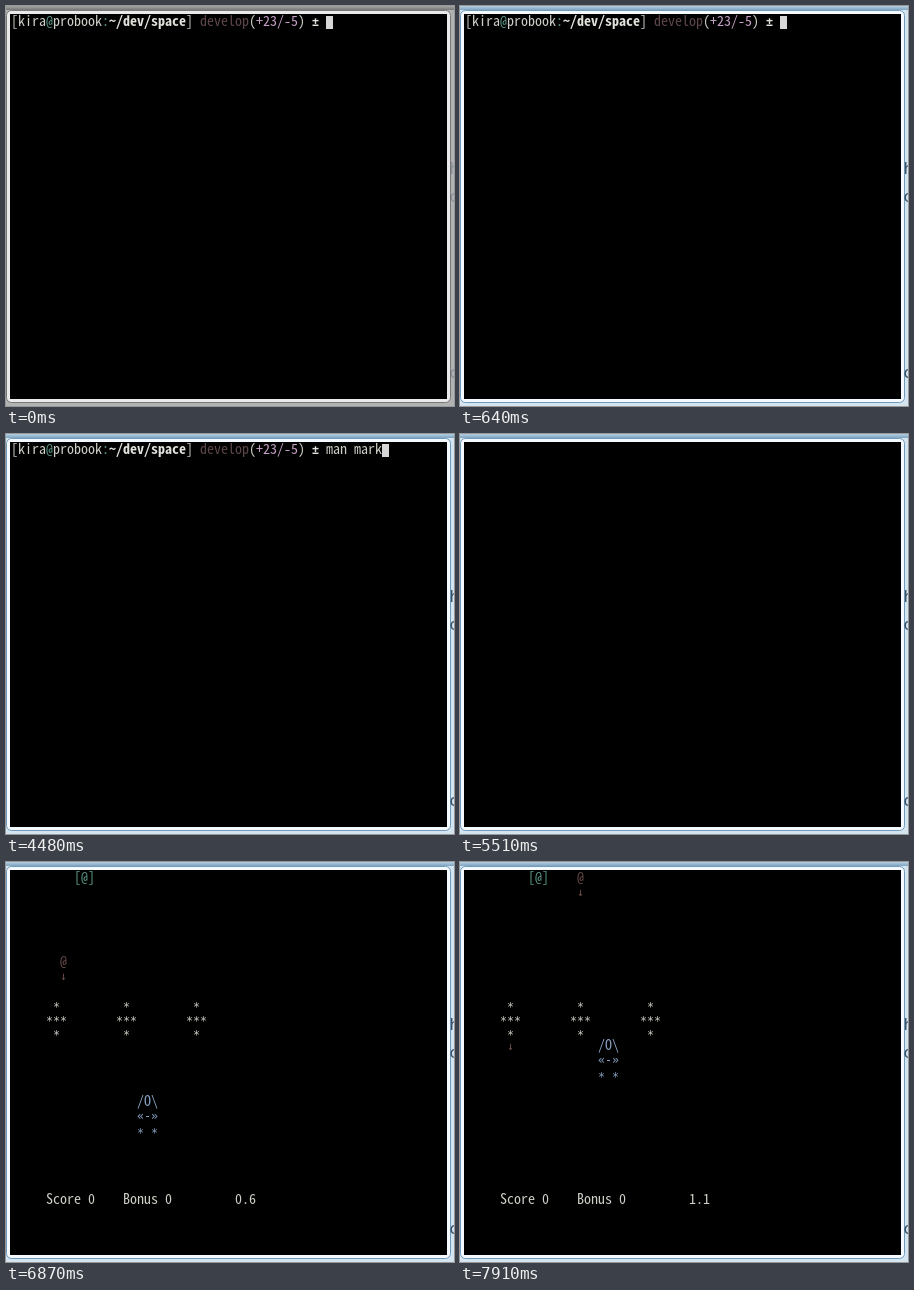
An HTML page for the animation above (7990 ms loop, 448 px wide and 400 px high).

```html
<!DOCTYPE html>
<html lang="en">
<head>
<meta charset="utf-8">
<title>Terminal game</title>
<style>
html, body { margin: 0; width: 100%; height: 100%; overflow: hidden; background: #000; }
svg { display: block; width: 448px; height: 400px; }
text { white-space: pre; fill: #cfcfc7; }
#term text {
  font-family: "Noto Sans Mono CJK JP", "Noto Sans Mono CJK SC", "Noto Sans Mono", "DejaVu Sans Mono", monospace;
  font-size: var(--size, 14px);
  letter-spacing: var(--gap, 0);
  font-variant-numeric: slashed-zero;
}
#term .sym { font-family: "DejaVu Sans Mono", monospace; font-size: 11.63px; letter-spacing: 0; }
#term .bold { font-weight: bold; fill: #e2e2dc; }
#term .teal { fill: #5c9c8c; }
#term .dim { fill: #5d464a; }
#term .pink { fill: #c5a0c4; }
#term .foe { fill: #6b4c49; }
#term .ship { fill: #88a3c4; }
.page text { font: 17px "Noto Sans", sans-serif; }
</style>
</head>
<body>
<svg viewBox="0 0 448 400">
  <defs>
    <linearGradient id="greyBar" x2="0" y2="1"><stop stop-color="#a4a4a4"/><stop offset="1" stop-color="#777"/></linearGradient>
    <linearGradient id="blueBar" x2="0" y2="1"><stop stop-color="#b4cfe2"/><stop offset="1" stop-color="#7fa3bf"/></linearGradient>
  </defs>
  <g class="page">
    <rect width="448" height="400" fill="#b2b2b2"/>
    <rect width="448" height="4" fill="url(#greyBar)"/>
    <rect x=".5" y="4.5" width="444" height="392" rx="5" fill="#eaeaea" stroke="#777"/>
    <g opacity=".35" id="words"></g>
  </g>
  <g class="page" id="focus" opacity="0">
    <rect width="448" height="400" fill="#d5e5f0"/>
    <rect width="448" height="4" fill="url(#blueBar)"/>
    <rect x=".5" y="4.5" width="444" height="392" rx="5" fill="#f4faff" stroke="#6f9abb"/>
    <g id="wordsLit"></g>
  </g>
  <rect x="4" y="8" width="437" height="385" fill="#000"/>
  <g id="term"></g>
</svg>
<script>
const LOOP = 7990, FADE = 160, GAME = 5350, FIRST = 5525, TICK = 215;
const NS = 'http://www.w3.org/2000/svg';
const $ = id => document.getElementById(id);
const term = $('term');

function add(parent, tag, attrs, text = '') {
  const el = document.createElementNS(NS, tag);
  for (const k in attrs) el.setAttribute(k, attrs[k]);
  el.textContent = text;
  parent.append(el);
}

// Place a run of text on the 7 x 14 px character grid.
const put = (col, row, text, cls = '', dy = 0) =>
  add(term, 'text', { x: 5 + col * 7, y: 20 + row * 14 + dy, class: cls }, text);
const star = (col, row, cls = '') => put(col, row, '*', 'sym ' + cls, 3);

for (const id of ['words', 'wordsLit'])
  [['h', 168], ['o', 196], ['c', 372]].forEach(([ch, y]) =>
    add($(id), 'text', { x: 443.5, y, style: 'fill:#3b5266' }, ch));

// Fit the installed monospace face to the grid.
function fitFont() {
  const ctx = document.createElement('canvas').getContext('2d');
  ctx.font = '14px "Noto Sans Mono CJK JP", "Noto Sans Mono CJK SC", "Noto Sans Mono", "DejaVu Sans Mono", monospace';
  const em = ctx.measureText('0000000000').width / 140;
  const size = em > 0.52 ? 12.5 : 14;
  term.style.setProperty('--size', size + 'px');
  term.style.setProperty('--gap', 7 - em * size + 'px');
}

const TYPED = [[0, ''], [3040, 'fzm'], [3120, 'fz'], [3200, ''], [3840, 'm'], [3920, 'ma'],
  [4240, 'man'], [4400, 'man m'], [4480, 'man mark'], [4960, '']];
const typedAt = t => TYPED.filter(([at]) => t >= at).pop()[1];

const PROMPT = [['[kira'], ['@', 'teal'], ['probook'], [':', 'teal'], ['~/dev/space', 'bold'], [']'],
  [' '], ['develop', 'dim'], ['('], ['+23/-5', 'pink'], [')'], [' '], ['±', 'sym bold'], [' ']];

function drawPrompt(typed) {
  let col = 0;
  for (const [text, cls] of PROMPT) {
    put(col, 0, text, cls);
    col += text.length;
  }
  put(col, 0, typed);
  add(term, 'rect', { x: 5 + (col + typed.length) * 7, y: 10, width: 7, height: 13, fill: '#d6d6d6' });
}

const SHIELDS = [6, 16, 26];
const FOE_COL = [10, 10, 9, 9, 8, 8, 7, 7, 8, 7, 7, 6];
const SHIP_ROW = [20, 19, 19, 18, 18, 17, 16, 16, 15, 14, 13, 12];

const shielded = (col, row) =>
  SHIELDS.some(c => Math.abs(c - col) + Math.abs(10 - row) < 2);

function drawFoe(col, row) {
  if (!shielded(col, row)) put(col, row, '@', 'foe');
  if (!shielded(col, row + 1)) put(col, row + 1, '↓', 'sym foe');
}

function drawShip(col, row) {
  put(col, row, '/O\\', 'ship');
  put(col, row + 1, '«-»', 'sym ship');
  star(col, row + 2, 'ship');
  star(col + 2, row + 2, 'ship');
}

function drawGame(n) {
  if (n) drawFoe(FOE_COL[n], n);
  if (n > 10) drawFoe(16, 0);
  put(9, 0, '[@]', 'teal');
  for (const c of SHIELDS)
    for (const [dx, row] of [[0, 9], [-1, 10], [0, 10], [1, 10], [0, 11]]) star(c + dx, row);
  drawShip(n < 9 ? 18 : 19, SHIP_ROW[n]);
  put(5, 23, 'Score 0');
  put(16, 23, 'Bonus 0');
  put(32, 23, (n / 10).toFixed(1));
}

let shown;
function render(t) {
  const lit = Math.floor((t - FADE) / 80) + 1;
  $('focus').setAttribute('opacity', Math.min(1, Math.max(0, lit / 7)));
  const n = Math.min(11, Math.floor((t - FIRST) / TICK));
  const key = t < GAME ? typedAt(t) : 'tick ' + n;
  if (key === shown) return;
  shown = key;
  term.replaceChildren();
  if (t < GAME) drawPrompt(key);
  else if (n >= 0) drawGame(n);
}

fitFont();
const start = performance.now();
function loop() {
  render((performance.now() - start) % LOOP);
  requestAnimationFrame(loop);
}
loop();
</script>
</body>
</html>
```
